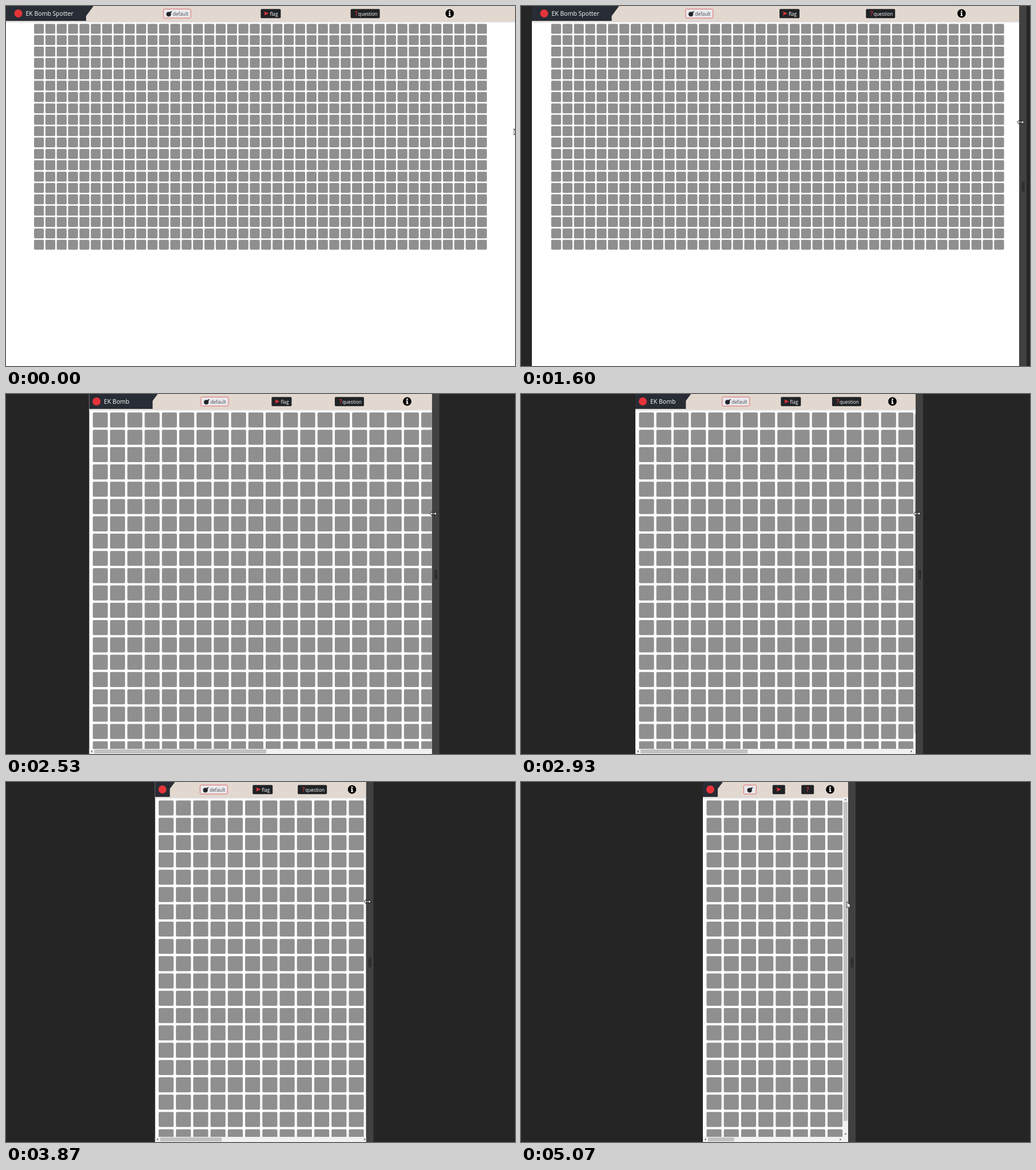
An HTML page with a canvas for the animation above (5.14 s loop, 890 by 629 pixels).

```html
<!DOCTYPE html>
<html lang="en">
<head>
<meta charset="utf-8">
<title>Responsive board</title>
<style>
html, body { margin: 0; width: 100%; height: 100%; overflow: hidden; background: #252525; }
canvas { display: block; }
</style>
</head>
<body>
<canvas id="stage" width="890" height="629"></canvas>
<script>
const ctx = document.getElementById('stage').getContext('2d');
const WIDTH = 890, HEIGHT = 629, LOOP = 5140, GRIP = 13;
const FONT = '"Open Sans", "Noto Sans", sans-serif';
const RED = '#e5343a', INK = '#212529';

// the drag: tick and left edge of the page
const DRAG = [[19, 0], [24, 19], [30, 66], [36, 121], [42, 194], [44, 200],
  [52, 232], [53, 232], [63, 289], [64, 289], [75, 318]];
// ticks at which the page is busy and repeats its last picture
const STALLS = [25, 31, 36, 45];

function leftEdge(tick) {
  const i = DRAG.findIndex(k => k[0] > tick);
  if (i === 0) return 0;
  if (i < 0) return DRAG.at(-1)[1];
  const [t0, x0] = DRAG[i - 1], [t1, x1] = DRAG[i];
  return x0 + (x1 - x0) * (tick - t0) / (t1 - t0);
}

function rect(x, y, w, h, fill) {
  ctx.fillStyle = fill;
  ctx.fillRect(x, y, w, h);
}

function round(x, y, w, h, fill, stroke) {
  ctx.beginPath();
  ctx.roundRect(x, y, w, h, 1.8);
  ctx.fillStyle = fill;
  ctx.fill();
  if (stroke) {
    ctx.strokeStyle = stroke;
    ctx.lineWidth = 1;
    ctx.stroke();
  }
}

function disc(x, y, r, fill) {
  ctx.beginPath();
  ctx.arc(x, y, r, 0, 7);
  ctx.fillStyle = fill;
  ctx.fill();
}

function poly(points, fill, stroke) {
  ctx.beginPath();
  points.forEach(p => ctx.lineTo(...p));
  ctx.closePath();
  if (stroke) {
    ctx.strokeStyle = stroke;
    ctx.lineWidth = 1.4;
    ctx.stroke();
  }
  ctx.fillStyle = fill;
  ctx.fill();
}

function text(str, x, y, size, fill, weight = 400) {
  ctx.font = `${weight} ${size}px ${FONT}`;
  ctx.fillStyle = fill;
  ctx.fillText(str, x, y);
}

function bomb(x) {
  disc(x - .7, 14.3, 4.1, INK);
  poly([[x, 12], [x + 2.6, 9.4], [x + 4.2, 11], [x + 1.6, 13.6]], INK);
  disc(x + 4, 9.8, .9, INK);
}

function flag(x) {
  poly([[x - 4, 9.5], [x + 4, 13], [x - 4, 16.5], [x - 2.8, 13]], RED);
}

function question(x) {
  text('?', x - 2.5, 17, 10.5, RED, 600);
}

const BUTTONS = [
  { label: 'default', w: 48, icon: bomb, textX: 16.5, light: true },
  { label: 'flag', w: 35, icon: flag, textX: 16 },
  { label: 'question', w: 51, icon: question, textX: 13 }
];

function drawButton(b, x, w, compact) {
  if (b.light) round(x, 5.3, w, 15.7, '#e8e8ec', '#e4676b');
  else round(x, 5.3, w, 16, '#202326');
  b.icon(x + (compact ? w / 2 : 10));
  if (!compact) text(b.label, x + b.textX, 16.7, 8.3, b.light ? '#45484c' : '#fff');
}

function drawInfo(x) {
  disc(x, 13, 7.4, '#000');
  disc(x, 9.2, 1.35, '#fff');
  rect(x - 1.1, 11.5, 2.2, 5.5, '#fff');
  rect(x - 2.1, 11.5, 2, 1.2, '#fff');
  rect(x - 2.1, 16.2, 4.2, 1.3, '#fff');
}

// buttons and info mark share the space right of the brand evenly
function drawMenu(edge, w) {
  const compact = w < 320;
  const widths = BUTTONS.map(b => compact ? 22 : b.w);
  const used = widths.reduce((a, b) => a + b) + (compact ? 11 : -8);
  const gap = (w - edge - used) / 5;
  let x = edge + gap + (compact ? 8 : 0);
  BUTTONS.forEach((b, i) => {
    drawButton(b, x, widths[i], compact);
    x += widths[i] + gap;
  });
  drawInfo(x);
}

function drawHeader(w, large) {
  const named = w >= 440, slant = large ? 13 : 9, pad = large ? 21.5 : 13;
  const brand = named ? Math.min(138 + (w - 770) / 60, w * .178) : 26;
  const shade = ctx.createLinearGradient(0, 26, 0, 30);
  shade.addColorStop(0, '#cfcbc8');
  shade.addColorStop(1, '#fff');
  rect(0, 26, WIDTH, 4, shade);
  rect(0, 0, WIDTH, 26.5, '#e2d8cf');
  rect(0, 0, brand, 26, '#282c34');
  poly([[brand - .5, 0], [brand + slant, 0], [brand - .5, slant * 1.4]], '#282c34');
  disc(pad, 13, 7, RED);
  if (named) text(brand > 112 ? 'EK Bomb Spotter' : 'EK Bomb', pad + 13, 17.2, 10.5, '#fff');
  drawMenu(brand + slant, w);
}

function drawBoard(w, large) {
  const pitch = large ? 19.86 : 30.23, size = large ? 17.3 : 26.2;
  const left = large ? Math.max(5.5, (w - 792) / 2) : 6.4, top = large ? 31.2 : 32.3;
  ctx.beginPath();
  for (let r = 0; r < 20; r++)
    for (let c = 0; c < 40; c++)
      ctx.roundRect(left + c * pitch, top + r * pitch, size, size, 2);
  ctx.fillStyle = '#8f8f8f';
  ctx.fill();
}

// small triangle pointing along (dx, dy)
function tip(x, y, dx, dy, fill = '#606060') {
  poly([[x + dx * 1.5, y + dy * 1.5], [x - dx - dy * 2, y - dy - dx * 2],
    [x - dx + dy * 2, y - dy + dx * 2]], fill);
}

function drawScrollbars(w, large) {
  const content = large ? 803 : 1220, view = large ? w : w - 9;
  if (view >= content) return;
  rect(0, 620, w, 9, '#f1f1f1');
  rect(9, 621, (view - 18) * view / content, 7, '#c1c1c1');
  tip(4.5, 624.5, -1, 0);
  tip(view - 4.5, 624.5, 1, 0);
  if (large) return;
  rect(view, 26.5, 9, 593.5, '#f1f1f1');
  rect(view + 1, 35, 7, 557, '#c1c1c1');
  tip(view + 4.5, 30.8, 0, -1);
  tip(view + 4.5, 615, 0, 1);
}

function drawArrow(x, y) {
  poly([[x, y], [x, y + 9], [x + 2, y + 7.2], [x + 3.4, y + 10], [x + 4.6, y + 9.4],
    [x + 3.4, y + 6.8], [x + 6, y + 6.6]], '#fff', '#111');
}

function drawResize(x, y) {
  const half = s => [[-2.8, .6], [-2.8, 2.4], [-5.5, 0], [-2.8, -2.4], [-2.8, -.6]]
    .map(([a, b]) => [x + s * a, y + s * b]);
  poly([...half(1), ...half(-1)], '#fff', '#111');
}

function drawCursor(tick, right) {
  if (tick === 0) drawArrow(888.5, 215.5);
  else if (tick >= 75) drawArrow(right - 1.7, 210);
  else if (tick > 16) drawResize(right + 2.5, Math.min(209, 179 + tick));
}

function draw(ms) {
  let tick = Math.floor(ms * .015 + .06);
  if (STALLS.includes(tick)) tick--;
  const left = leftEdge(tick), right = WIDTH - left;
  // page layout trails the window edge by one tick
  const w = WIDTH - 2 * leftEdge(tick - 1), large = w >= 660;

  rect(0, 0, WIDTH, HEIGHT, '#252525');
  rect(right, 0, GRIP, HEIGHT, '#414141');
  for (const o of [5, 7.7]) rect(right + o, 307, 1.2, 17, '#1c1c1c');

  ctx.save();
  ctx.beginPath();
  ctx.rect(left, 0, right - left, HEIGHT);
  ctx.clip();
  ctx.translate(left, 0);
  rect(0, 0, WIDTH, HEIGHT, '#fff');
  drawHeader(w, large);
  drawBoard(w, large);
  drawScrollbars(w, large);
  ctx.restore();
  drawCursor(tick, right);
}

function loop(now) {
  draw(now % LOOP);
  requestAnimationFrame(loop);
}
requestAnimationFrame(loop);
</script>
</body>
</html>
```
